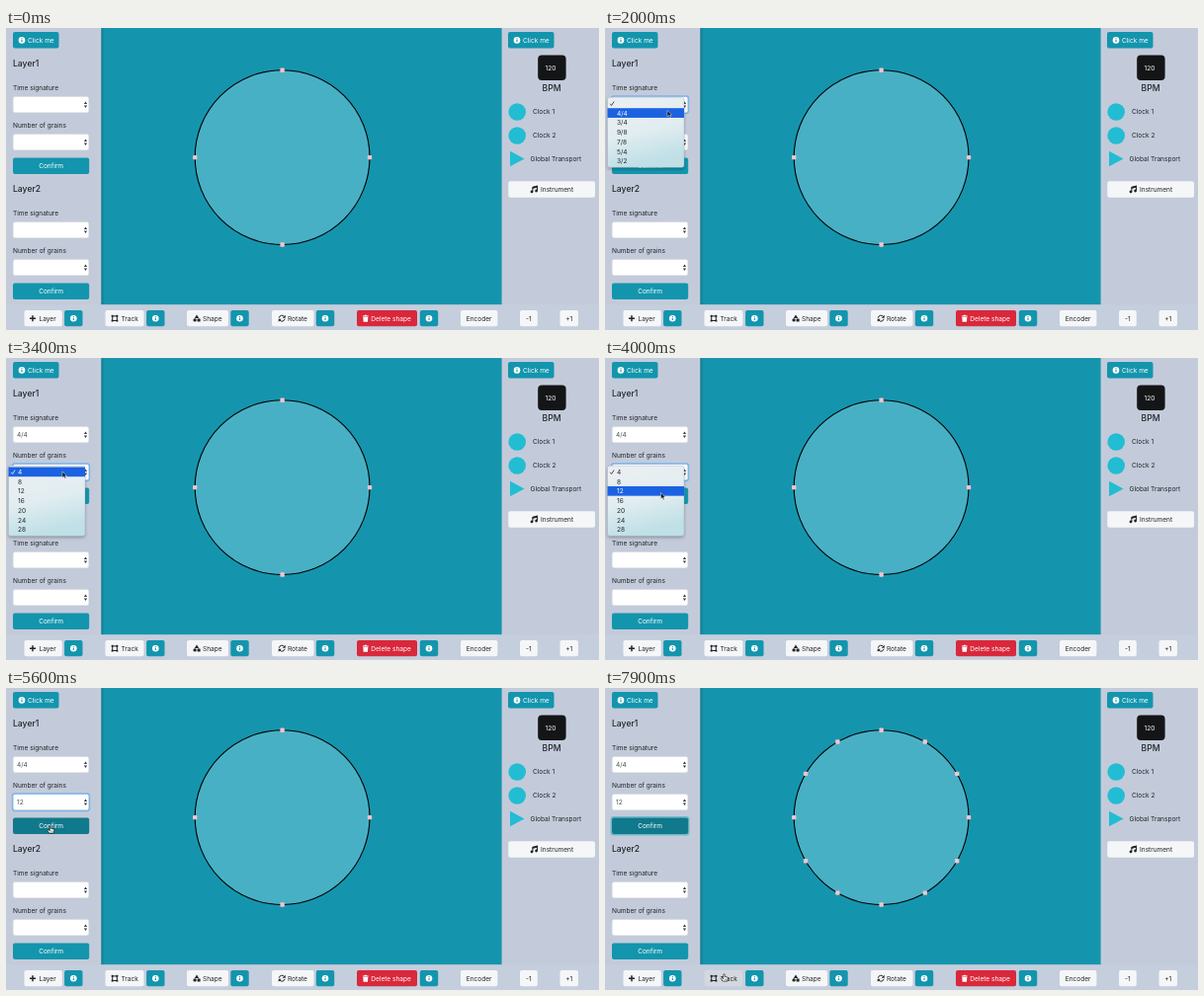
An HTML page for the animation above (8 s loop, 600 by 306 pixels).

```html
<!DOCTYPE html>
<html lang="en">
<head>
<meta charset="utf-8">
<title>Grain sequencer</title>
<style>
html, body { margin: 0; width: 100%; height: 100%; overflow: hidden; }
svg { display: block; width: 600px; height: 306px; }
text { font: 6.55px Inter, "Open Sans", sans-serif; fill: #212529; }
text.head { font-size: 8.6px; font-weight: 500; }
text.white { fill: #fff; }
text.mid { text-anchor: middle; }
text.value { fill: #495057; }
</style>
</head>
<body>
<svg id="stage" viewBox="0 0 600 306"></svg>
<script>
const LOOP = 8000, STEP = 100;
const TEAL = '#1395ad', DARK = '#10798b', LIGHT = '#f5f6f8', RED = '#d9283b', INK = '#212529';

const OPEN_TIME = 1500, PICK_TIME = 2400, OPEN_GRAINS = 3300, PICK_GRAINS = 4700, CONFIRM = 5800;
const SHOW_CURSOR = 500;
const PATH = [
  [500, 92, 92], [900, 66, 76.5], [1700, 66, 76.5], [2000, 63, 83.5], [2400, 63, 84],
  [2800, 58, 108.5], [3100, 57, 114.5], [3500, 57, 115], [4000, 56.5, 136.5],
  [4700, 56.5, 136.5], [5200, 45, 139.5], [6200, 45, 139.5], [7100, 120.5, 289.5]
];

const rect = (x, y, w, h, fill, extra = '') =>
  `<rect x="${x}" y="${y}" width="${w}" height="${h}" fill="${fill}" ${extra}/>`;
const circle = (x, y, r, fill, extra = '') =>
  `<circle cx="${x}" cy="${y}" r="${r}" fill="${fill}" ${extra}/>`;
const path = (d, fill, extra = '') => `<path d="${d}" fill="${fill}" ${extra}/>`;
const text = (x, y, s, cls = '', extra = '') => {
  const drop = cls.includes('head') ? 3.1 : 2.4;
  return `<text x="${x}" y="${y + drop}" class="${cls}" ${extra}>${s}</text>`;
};
const group = (id, body, extra = '') => `<g id="${id}" ${extra}>${body}</g>`;
const at = (x, y, body) => `<g transform="translate(${x} ${y})">${body}</g>`;

const info = (x, y) => circle(x, y, 3.3, '#fff') +
  rect(x - .55, y - .4, 1.1, 2.2, TEAL) + circle(x, y - 1.6, .65, TEAL);

const button = (x, y, w, h, fill, id = '') => rect(x, y, w, h, fill, `rx="2" ${id && `id="${id}"`}`);

const clickMe = x => button(x, 4, 46.5, 16.5, TEAL) + info(x + 9, 12.4) + text(x + 15, 12.4, 'Click me', 'white');

const select = (y, id) =>
  rect(7.2, y, 76.6, 16.2, '#fff', `rx="2" stroke="#ced4da" stroke-width=".5"`) +
  rect(6.5, y - .6, 78, 17.4, 'none', `id="${id}Ring" rx="2.4" stroke="#7db5ee" stroke-width="1.5"`) +
  path(`M78.9 ${y + 7.4}h3.2l-1.6-2.5zM78.9 ${y + 9}h3.2l-1.6 2.5z`, '#343a40') +
  text(11, y + 8.3, '', 'value', `id="${id}Value"`);

const layer = n => {
  const y = (n - 1) * 127;
  return text(7, 36 + y, 'Layer' + n, 'head') +
    text(7, 61 + y, 'Time signature') + select(69.6 + y, 'time' + n) +
    text(7, 98.8 + y, 'Number of grains') + select(107.6 + y, 'grains' + n) +
    rect(6.3, 130.8 + y, 78.4, 18, 'none', `id="ring${n}" rx="2.6" stroke="#6db9ca" stroke-width="1.5"`) +
    button(7, 131.5 + y, 77.2, 16.6, TEAL, 'confirm' + n) +
    text(45.6, 139.8 + y, 'Confirm', 'white mid');
};

const icons = {
  plus: path('M-3 0H3M0-3V3', 'none', `stroke="${INK}" stroke-width="1.5"`),
  track: rect(-2.3, -2.3, 4.6, 4.6, 'none', `stroke="${INK}"`) +
    [-2.4, 2.4].map(x => [-2.4, 2.4].map(y => rect(x - .95, y - .95, 1.9, 1.9, INK)).join('')).join(''),
  shape: path('M0-3.6L2.2-.2H-2.2z', INK) + circle(-1.9, 1.7, 1.7, INK) + rect(.6, .4, 3, 3, INK, 'rx=".3"'),
  rotate: path('M-2.9-.5A2.9 2.9 0 0 1 2.3-1.8M2.9.5A2.9 2.9 0 0 1-2.3 1.8', 'none',
    `stroke="${INK}" stroke-width="1"`) + path('M3.5-3.5V-.5H.5zM-3.5 3.5V.5H-.5z', INK),
  trash: path('M-2.9-2.7h1.7l.5-.7h1.4l.5.7h1.7v.9h-5.8zM-2.5-1.3h5l-.3 4.8h-4.4z', '#fff'),
  music: path('M-1.6 2.2V-2.2L3-3.4V1.3', 'none', `stroke="${INK}" stroke-width="1"`) +
    path('M-2-2.5L3.5-4V-2L-2-.6z', INK) + circle(-2.5, 2.3, 1.4, INK) + circle(2.1, 1.4, 1.4, INK)
};

const tool = (x, w, icon, iconX, label, textX, infoX, fill = LIGHT) =>
  button(x, 286, w, 16.2, fill, icon) + at(iconX, 294.2, icons[icon]) +
  text(textX, 294.2, label, fill === RED ? 'white' : '') +
  button(infoX - 9.2, 286, 18.4, 16.2, TEAL) + info(infoX, 294.2);
const plain = (x, w, label) => button(x, 286, w, 16.2, LIGHT) + text(x + w / 2, 294.2, label, 'mid');

// Dropdown: rows of text with a tick on the current row and a bar on the hovered one
const PITCH = 9.72;
const menu = (id, top, rows) => group(id,
  rect(2.5, top, 77.5, rows.length * PITCH + 3, 'url(#menuFill)',
    'rx="2.5" stroke="#8b9aa8" stroke-opacity=".55" stroke-width=".5" filter="url(#drop)"') +
  rect(2.5, 0, 77.5, PITCH, '#1b62e2', `id="${id}Bar"`) +
  path(`M5.2 ${top + 6.5}l1.4 1.7 2.5-4`, 'none', `id="${id}Tick" stroke="${INK}" stroke-width=".8"`) +
  rows.map((s, i) => text(12, top + 6.3 + i * PITCH, s, 'row')).join(''));

const CX = 279.6, CY = 131.1, R = 88.4;
const dots = n => Array.from({ length: n }, (_, i) => {
  const a = i * 2 * Math.PI / n;
  return rect(CX + R * Math.sin(a) - 2.2, CY - R * Math.cos(a) - 2.2, 4.4, 4.4, '#f6c3cd', 'rx="1"');
}).join('');

const arrow = path('M0 0V6.3L1.5 5 2.5 7.2 3.6 6.7 2.6 4.6H4.5z', '#111', 'stroke="#fff" stroke-width=".45"');
const hand = path('M-.7.6Q0-.5.7.6V3L3 3.4Q3.9 3.6 3.8 4.6L3.2 7.6H-1.3L-3.2 4.8Q-2.8 3.7-1.7 4.5L-.7 5.3z',
  '#fff', 'stroke="#111" stroke-width=".65" stroke-linejoin="round"') +
  path('M.9 5V6.7M2.2 5V6.7', 'none', 'stroke="#111" stroke-width=".4"');

const stage = document.getElementById('stage');
stage.innerHTML = `<defs>
  <linearGradient id="menuFill" x1="0" y1="0" x2=".25" y2="1">
    <stop offset="0" stop-color="#eceff2"/><stop offset=".55" stop-color="#e2edf1"/><stop offset="1" stop-color="#bfe0e6"/>
  </linearGradient>
  <linearGradient id="edge"><stop stop-color="#063c4a" stop-opacity=".32"/><stop offset="1" stop-color="#063c4a" stop-opacity="0"/></linearGradient>
  <filter id="drop" x="-15%" y="-15%" width="130%" height="130%">
    <feDropShadow dx="0" dy="1.5" stdDeviation="1.8" flood-color="#000" flood-opacity=".3"/>
  </filter>
</defs>` +
  rect(0, 0, 600, 306, '#1595ad') +
  circle(CX, CY, R, '#48b0c5', 'stroke="#000" stroke-width="1.1"') +
  group('dots4', dots(4)) + group('dots12', dots(12)) +
  rect(96, 0, 4, 280, 'url(#edge)') +
  rect(0, 0, 96.3, 306, '#c3cbda') + rect(501.6, 0, 98.4, 306, '#c3cbda') +
  rect(0, 280.2, 600, 25.8, '#c5cedd') +
  clickMe(7) + layer(1) + layer(2) +
  clickMe(508) +
  rect(538.2, 27.6, 28.4, 25.4, '#141517', 'rx="4"') +
  text(551, 40.6, '120', 'white mid') + text(552, 60.6, 'BPM', 'head mid') +
  circle(517.2, 85, 8.8, '#22bdd3') + text(533, 85, 'Clock 1') +
  circle(517.2, 109, 8.8, '#22bdd3') + text(533, 109, 'Clock 2') +
  path('M510 124.8L524.6 132.5 510 140.2z', '#22bdd3') + text(530.5, 132.6, 'Global Transport') +
  button(508.3, 155.2, 87.7, 16.6, LIGHT) + at(534.5, 163.6, icons.music) + text(541, 163.4, 'Instrument') +
  tool(18.5, 38.3, 'plus', 27, 'Layer', 33.5, 68.3) +
  tool(100.5, 39, 'track', 110, 'Track', 116.5, 151.3) +
  tool(183, 42, 'shape', 193, 'Shape', 199, 236.5) +
  tool(269, 42.5, 'rotate', 279.2, 'Rotate', 285, 323) +
  tool(355, 61, 'trash', 363.8, 'Delete shape', 369.3, 428, RED) +
  plain(460, 37.4, 'Encoder') + plain(520, 17.8, '-1') + plain(560.5, 18.5, '+1') +
  menu('timeMenu', 70.3, ['', '4/4', '3/4', '9/8', '7/8', '5/4', '3/2']) +
  menu('grainMenu', 109.3, [4, 8, 12, 16, 20, 24, 28]) +
  group('cursor', group('arrow', arrow) + group('hand', hand));

const $ = id => document.getElementById(id);
const show = (id, on) => $(id).setAttribute('display', on ? 'inline' : 'none');
const fill = (id, color) => $(id).setAttribute('fill', color);
const within = (p, x, y, w, h) => p.x >= x && p.x <= x + w && p.y >= y && p.y <= y + h;

function cursorAt(t) {
  const i = PATH.findIndex(k => k[0] > t);
  if (i === 0) return { x: PATH[0][1], y: PATH[0][2] };
  const [ta, xa, ya] = PATH[(i < 0 ? PATH.length : i) - 1];
  if (i < 0) return { x: xa, y: ya };
  const [tb, xb, yb] = PATH[i];
  const u = (t - ta) / (tb - ta), e = u * u * (3 - 2 * u);
  return { x: xa + (xb - xa) * e, y: ya + (yb - ya) * e };
}

function setMenu(id, top, open, p) {
  show(id, open);
  if (!open) return;
  const row = Math.max(0, Math.min(6, Math.floor((p.y - top - 1.2) / PITCH)));
  $(id + 'Bar').setAttribute('y', top + 1.2 + row * PITCH);
  $(id + 'Tick').setAttribute('stroke', row ? INK : '#fff');
  $(id).querySelectorAll('.row').forEach((el, i) => { el.style.fill = i === row ? '#fff' : INK; });
}

function draw(t) {
  const p = cursorAt(t);
  const timeOpen = t >= OPEN_TIME && t < PICK_TIME;
  const grainsOpen = t >= OPEN_GRAINS && t < PICK_GRAINS;
  const done = t >= CONFIRM;
  const overConfirm = !grainsOpen && !timeOpen && within(p, 7, 131.5, 77, 16.6);
  const overTrack = within(p, 100.5, 286, 39, 16.2);

  setMenu('timeMenu', 70.3, timeOpen, p);
  setMenu('grainMenu', 109.3, grainsOpen, p);
  $('time1Value').textContent = t >= PICK_TIME ? '4/4' : '';
  $('grains1Value').textContent = t >= PICK_GRAINS ? '12' : t >= PICK_TIME ? '4' : '';

  show('time1Ring', t >= OPEN_TIME && t < OPEN_GRAINS);
  show('grains1Ring', t >= OPEN_GRAINS && !done);
  ['time2Ring', 'grains2Ring', 'ring2'].forEach(id => show(id, false));
  show('ring1', done);
  fill('confirm1', overConfirm || done ? DARK : TEAL);
  fill('track', overTrack ? '#d3d8e0' : LIGHT);
  show('dots4', !done);
  show('dots12', done);

  const pointing = overConfirm || overTrack;
  show('cursor', t >= SHOW_CURSOR);
  show('arrow', !pointing);
  show('hand', pointing);
  $('cursor').setAttribute('transform', `translate(${p.x} ${p.y})`);
}

const start = performance.now();
function tick() {
  const t = (performance.now() - start) % LOOP;
  draw(Math.floor(t / STEP) * STEP);
  requestAnimationFrame(tick);
}
draw(0);
requestAnimationFrame(tick);
</script>
</body>
</html>
```
